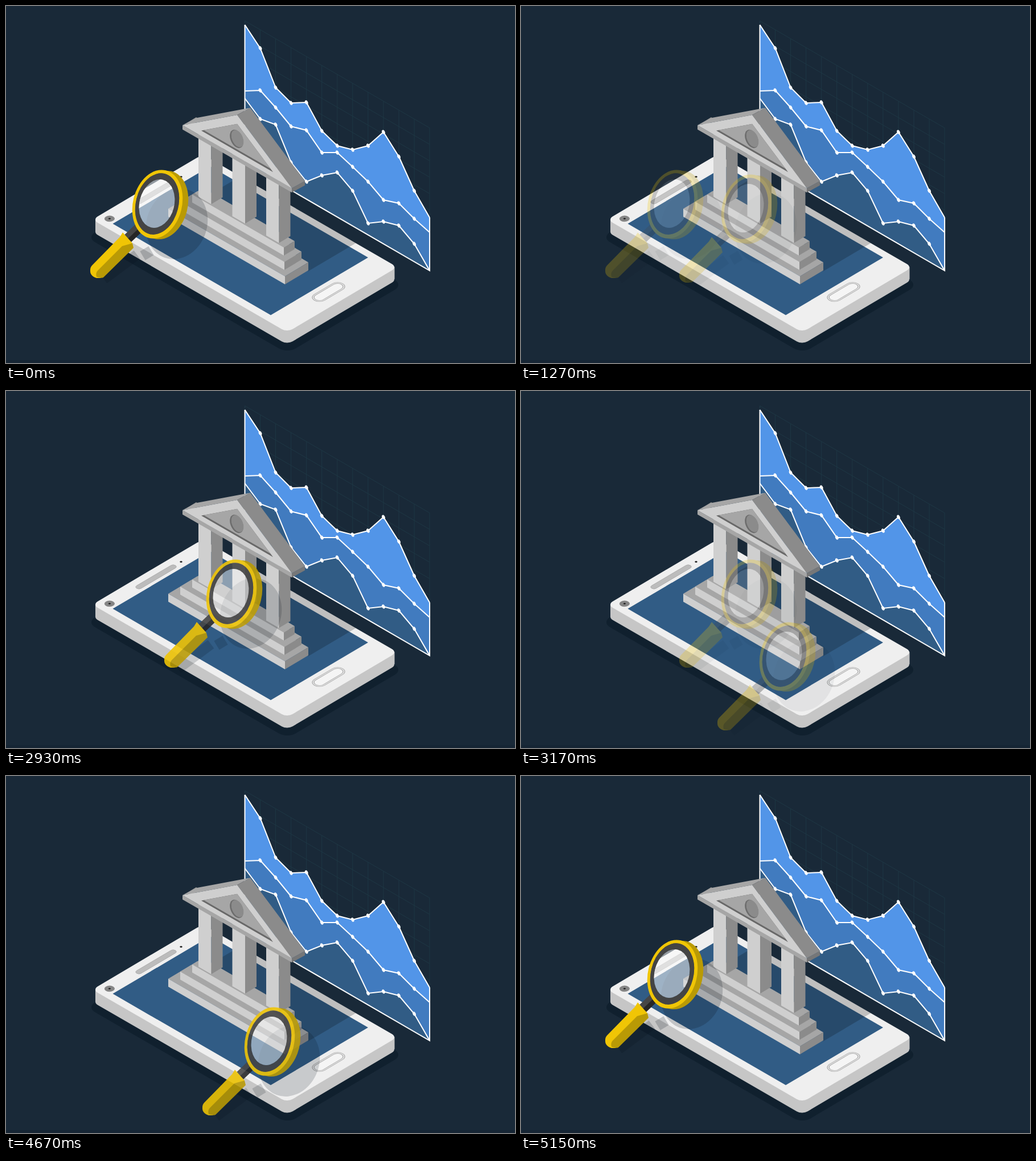
An HTML page that plays this animation: 894 by 626 pixels, repeating every 5180 ms.

```html
<!DOCTYPE html>
<html lang="en">
<head>
<meta charset="utf-8">
<title>Bank search</title>
<style>
  html, body { margin: 0; width: 100%; height: 100%; overflow: hidden; background: #192938; }
  svg { display: block; width: 100vw; height: 100vh; }
  .light { fill: #cfcfcf; }
  .mid { fill: #a6a6a6; }
  .dark { fill: #8b8b8b; }
  .bright { fill: #f0c505; }
  .gold { fill: #b99a05; }
  .button { stroke: #b0b0b0; }
</style>
</head>
<body>
<svg viewBox="0 0 894 626">
  <defs>
    <rect id="slab" width="342.5" height="193.5" rx="9.5" transform="matrix(1 .577 1 -.59 151.5 374.5)"/>
    <g id="glass">
      <g opacity=".19" fill="#08101c">
        <ellipse rx="53" ry="63" transform="translate(300 382) rotate(20)"/>
        <path d="M255 429L240 438M230 436L172 479" stroke="#08101c" stroke-width="18"/>
      </g>
      <path d="M213 407L236 385" stroke="#464646" stroke-width="15"/>
      <path d="M217 411L240 389" stroke="#262626" stroke-width="8"/>
      <path class="bright" d="M205 397L222 416L212 430L166 477H159Q147 473 148 463Q148 458 151 455L200 405Z"/>
      <path class="gold" d="M204 421L222 416L224 424L171 476Q168 478 159 475Q157 468 161 464Z"/>
      <g id="rings" fill-rule="evenodd"></g>
    </g>
  </defs>

  <rect y="621" width="894" height="5" fill="#162534"/>
  <g id="chart"></g>

  <g id="phone">
    <use href="#slab" y="31" fill="#10202e" stroke="#10202e" stroke-width="10"/>
    <use href="#slab" y="21.5" fill="#c6c6c6"/>
    <path d="M157 374.500V396L682.500 479V457.500Z" fill="#c6c6c6"/>
    <use href="#slab" fill="#efefef"/>
    <!-- x runs along the long side, y along the short side -->
    <g transform="matrix(1 .577 1 -.59 151.5 374.5)">
      <rect x="24.500" y="11.500" width="277.500" height="171" fill="#315c85"/>
      <rect x="66.500" y="110" width="203" height="83.500" opacity=".2"/>
      <circle cx="14" cy="16.400" r="6.400" fill="#858585"/>
      <circle cx="14" cy="16.400" r="1.500" fill="#222"/>
      <circle cx="14.600" cy="141.400" r="1.600" fill="#222"/>
      <rect x="11" y="63" width="8" height="68" rx="4" fill="#bcbcbc" stroke="#aaa" stroke-width=".7"/>
      <rect class="button" x="309.600" y="71.600" width="18" height="49.600" rx="9" fill="#e6e6e6"/>
      <rect class="button" x="311.800" y="73.800" width="13.600" height="45.200" rx="6.800" fill="#f5f5f5"/>
    </g>
  </g>

  <g id="bank"></g>

  <g id="poses">
    <use href="#glass"/>
    <use href="#glass" x="130" y="8"/>
    <use href="#glass" x="197" y="118"/>
  </g>
</svg>
<script>
const $ = id => document.getElementById(id);
const poly = (points, look) => `<polygon points="${points.join(' ')}" class="${look}"/>`;
const add = (p, q) => [p[0] + q[0], p[1] + q[1]];
const scale = (p, center, k) => p.map((value, i) => center[i] + (value - center[i]) * k);

// Magnifier: tilted ovals, hollow when a hole is given
function oval(cx, cy, rx, ry) {
  const tilt = 14 * Math.PI / 180, dx = ry * Math.sin(tilt), dy = ry * Math.cos(tilt);
  const arc = `A${rx} ${ry} 14 1 1 `;
  return `M${cx + dx} ${cy - dy}${arc}${cx - dx} ${cy + dy}${arc}${cx + dx} ${cy - dy}Z`;
}
const lens = oval(265, 346.5, 30.5, 43), bezel = oval(265.5, 347, 37.5, 54.5);
$('rings').innerHTML = `
  <path class="gold" d="${oval(276, 349, 43, 61) + bezel}"/>
  <path class="bright" d="${oval(266, 347.5, 43, 61) + bezel}"/>
  <path fill="#444" d="${bezel + lens}"/>
  <path fill="#fff" opacity=".53" d="${lens}"/>`;

// Area chart on a skewed grid
const LEFT = 419.5, STEP = 27.05, DROP = 15.65;
const series = {
  '#5295e8': [33, 74, 143, 170, 169, 219, 245, 252, 245, 221, 264, 324, 371],
  '#417bbf': [149, 148, 178, 211, 218, 257, 257, 282, 308, 340, 346, 373, 397],
  '#315c85': [162, 198, 208, 274, 308, 297, 292, 324, 381, 378, 385, 417, 464],
};
function drawChart() {
  let grid = '', areas = '', lines = '';
  for (let i = 0; i <= 12; i++) grid += `M${LEFT + i * STEP} ${26 + i * DROP}v250`;
  for (let i = 0; i < 9; i++) grid += `M${LEFT} ${26 + i * 28.8}l${12 * STEP} ${12 * DROP}`;
  for (const [color, values] of Object.entries(series)) {
    const points = values.map((y, i) => [LEFT + i * STEP, y]), path = 'M' + points.join('L');
    areas += `<path d="${path}V464L${LEFT} 276Z" fill="${color}"/>`;
    lines += `<path d="${path}" fill="none" stroke="#fff" stroke-width="2"/>`;
    for (const [x, y] of points.slice(1, -1))
      lines += `<ellipse rx="2.6" ry="3.8" fill="#fff" transform="translate(${x} ${y}) rotate(-25)"/>`;
  }
  return `<path d="${grid}" stroke="#1e3744"/>${areas}${lines}
    <path d="M${LEFT} 33V276l${12 * STEP} 188V371" fill="none" stroke="#fff" stroke-width="2"/>`;
}
$('chart').innerHTML = drawChart();

// Isometric box from the left corner of its top
function box(x, y, width, depth, height) {
  const left = [x, y], front = add(left, [width, width * .578]);
  const back = [depth, -depth * .6], down = [0, height], right = add(front, back);
  return poly([left, front, right, add(left, back)], 'mid')
    + poly([left, front, add(front, down), add(left, down)], 'light')
    + poly([front, right, add(right, down), add(front, down)], 'dark');
}
function roof() {
  const left = [310, 209], peak = [406, 191], right = [502, 319.5];
  const back = [23, -12.5], down = [0, 7.5];
  const inner = [left, peak, right].map(p => scale(p, [406, 237], .657));
  const side = (p, q, offset, look) => poly([p, q, add(q, offset), add(p, offset)], look);
  return poly([[318, 205], [334, 195], [339, 198], [326, 209]], 'dark')
    + side(left, peak, back, 'mid')
    + side(peak, right, back, 'dark')
    + side(right, add(right, back), down, 'dark" fill-opacity=".99" style="fill:#777')
    + side(left, right, down, 'mid')
    + poly([left, peak, right], 'light')
    + poly(inner, 'dark" style="fill:#686868')
    + poly(inner.map(p => scale(p, inner[1], .93)), 'mid')
    + '<ellipse rx="10.5" ry="17" transform="translate(405 233) rotate(-24)" fill="#6c6c6c"/>'
    + '<ellipse rx="9.5" ry="16" transform="translate(406.5 232.5) rotate(-24)" class="dark"/>';
}
let bank = '';
for (let i = 0; i < 3; i++) bank += box(285 + 21 * i, 355.5 - 12.5 * i, 205 - 22 * i, 41 - 11 * i, 14);
for (let i = 0; i < 3; i++) bank += box(338 + 59.5 * i, 225.5 + 34 * i, 22.5, 20, 109);
$('bank').innerHTML = bank + roof();

// Each fade hands over to the next pose, in steps of one tick
const LOOP = 5180, TICK = 30;
const fades = [
  { start: 1030, out: 18, into: 20 },
  { start: 2930, out: 18, into: 18 },
  { start: 4670, out: 17, into: 17 },
];
const poses = [...$('poses').children];
const begin = performance.now();

function draw() {
  const t = (performance.now() - begin) % LOOP, opacity = [1, 0, 0];
  fades.forEach(({ start, out, into }, i) => {
    if (t < start) return;
    const n = Math.floor((t - start) / TICK) + 1;
    opacity[i] = (1 - Math.min(1, n / out)) ** 2;
    opacity[(i + 1) % 3] = Math.min(1, (n - 1) / (into - 1)) ** 1.6;
  });
  poses.forEach((pose, i) => pose.setAttribute('opacity', opacity[i]));
  requestAnimationFrame(draw);
}
draw();
</script>
</body>
</html>
```
